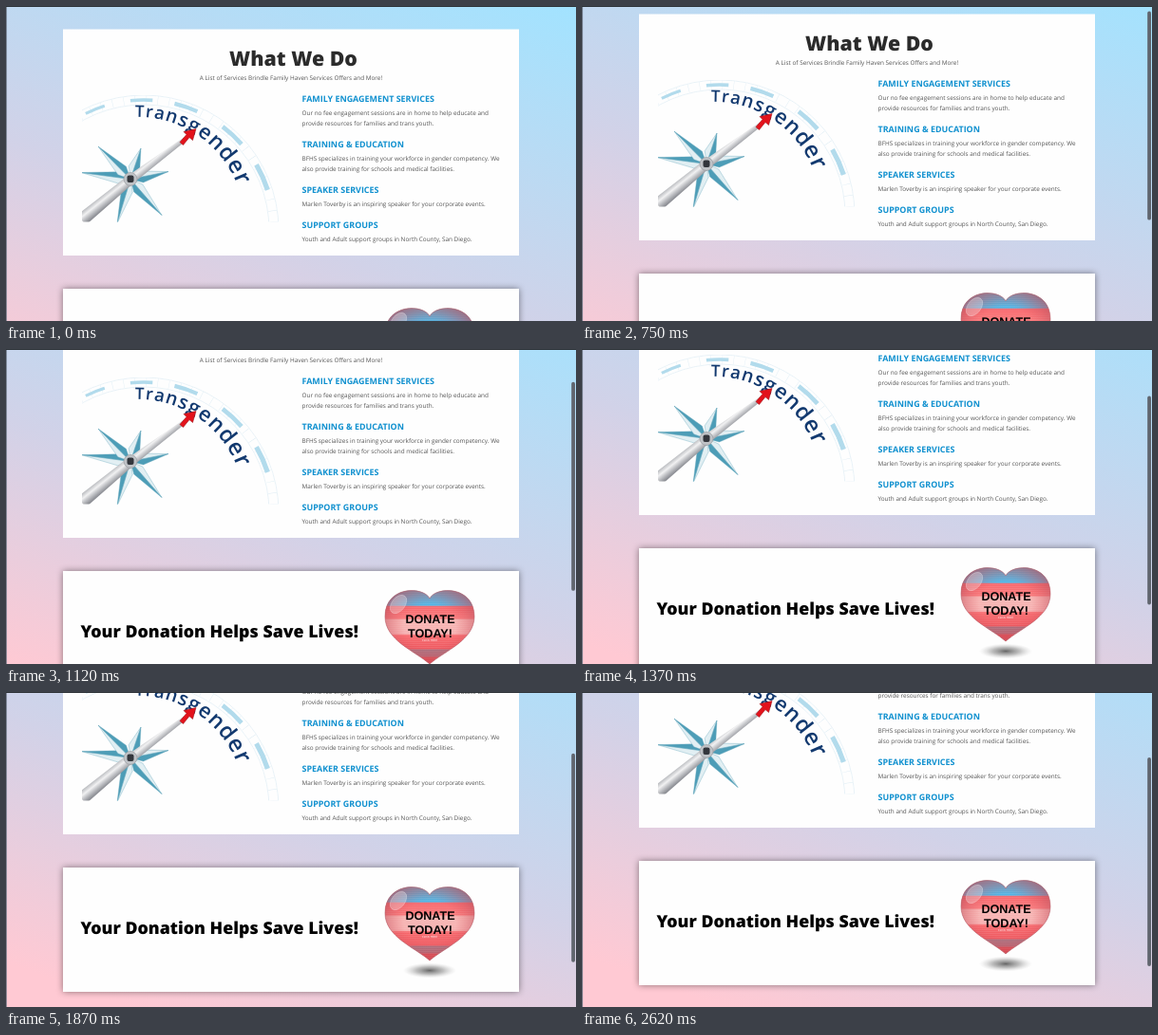
Recreate the animation shown at these times as an HTML page. Size 600x332 px, loop 2.88 s.

```html
<!DOCTYPE html>
<html lang="en">
<head>
<meta charset="utf-8">
<title>What We Do</title>
<style>
@property --s { syntax: "<number>"; inherits: true; initial-value: 0; }
html { animation: scroll 2.88s step-end infinite; }
html, body { margin: 0; width: 100%; height: 100%; overflow: hidden; background: #d3cfe6; }
svg { display: block; width: 600px; height: 332px; }
#page { transform: translateY(calc(var(--s) * -1px)); }
#bar { transform: translateY(calc(var(--s) * .61px - 4.2px)); opacity: min(1, var(--s)); }
text { font-family: "Open Sans", sans-serif; text-rendering: geometricPrecision; }
.title { font-size: 21.33px; font-weight: 800; fill: #2b2b2b; text-anchor: middle; }
.copy { font-size: 6.4px; fill: #555; }
.mid { text-anchor: middle; }
.head { font-size: 8.93px; font-weight: 700; fill: #0f90cf; }
.give { font-size: 17.78px; font-weight: 800; }
.arc { font-weight: 600; letter-spacing: 1px; fill: #12396f; }
.btn { font: 700 12.6px "Liberation Sans", Arial, sans-serif; text-anchor: middle; }
.tiny { font-size: 3px; fill: #fff; }
.lift { filter: drop-shadow(0 0 3.5px rgba(0, 0, 0, .45)); }
@keyframes scroll {
  0% { --s: 0; }
  21.52% { --s: 4; }
  26.04% { --s: 16; }
  30.2% { --s: 31.5; }
  34.72% { --s: 48.5; }
  38.88% { --s: 64; }
  43.4% { --s: 77; }
  47.56% { --s: 88; }
  52.08% { --s: 97; }
  56.24% { --s: 104; }
  60.76% { --s: 109; }
  64.92% { --s: 113; }
  69.44% { --s: 115.5; }
  73.6% { --s: 117.2; }
  78.12% { --s: 118.5; }
  82.28% { --s: 119.5; }
  90.96%, 100% { --s: 120; }
}
</style>
</head>
<body>
<svg viewBox="0 0 600 332">
  <defs>
    <linearGradient id="sky" gradientUnits="userSpaceOnUse" x1="408" y1="-70" x2="192" y2="522">
      <stop offset="0" stop-color="#a2e3ff"/>
      <stop offset=".53" stop-color="#d1d2e8"/>
      <stop offset=".92" stop-color="#ffc9d3"/>
    </linearGradient>
    <linearGradient id="steel" gradientUnits="userSpaceOnUse" x1="127" y1="178" x2="135" y2="188">
      <stop offset="0" stop-color="#b4b6ba"/>
      <stop offset=".4" stop-color="#f1f1f2"/>
      <stop offset=".6" stop-color="#cfd0d3"/>
      <stop offset="1" stop-color="#909298"/>
    </linearGradient>
    <linearGradient id="flag" x2="0" y2="1">
      <stop offset="0" stop-color="#5aa6ca"/>
      <stop offset=".2" stop-color="#4fb5e6"/>
      <stop offset=".22" stop-color="#f8666b"/>
      <stop offset=".38" stop-color="#f97a7c"/>
      <stop offset=".4" stop-color="#f6b4b2"/>
      <stop offset=".59" stop-color="#f6b0b0"/>
      <stop offset=".61" stop-color="#f8696d"/>
      <stop offset=".79" stop-color="#ee5960"/>
      <stop offset=".81" stop-color="#a5707f"/>
      <stop offset=".89" stop-color="#ad6a78"/>
      <stop offset=".92" stop-color="#e2464e"/>
    </linearGradient>
    <radialGradient id="rim" cx=".5" cy=".48" r=".58">
      <stop offset=".5" stop-color="#e0525c" stop-opacity="0"/>
      <stop offset="1" stop-color="#b8525f" stop-opacity=".7"/>
    </radialGradient>
    <radialGradient id="shade">
      <stop offset="0" stop-color="#666"/>
      <stop offset=".5" stop-color="#999" stop-opacity=".65"/>
      <stop offset="1" stop-color="#ccc" stop-opacity="0"/>
    </radialGradient>
    <pattern id="lines" width="4" height="2" patternUnits="userSpaceOnUse">
      <path d="M0 .5H4" stroke="#fff" stroke-width=".5" opacity=".2"/>
    </pattern>
    <clipPath id="photo"><rect x="80" y="94" width="207" height="133.5"/></clipPath>
    <path id="curve" d="M136 117A112 112 0 0 1 251 229"/>
    <path id="heart" d="M446 327C440 314 399 313 399 346C399 371 430 382 446 396C462 382 493 371 493 346C493 313 452 314 446 327Z"/>
  </defs>

  <g id="page">
    <rect width="600" height="460" fill="url(#sky)"/>
    <rect x="60" y="24.5" width="480" height="238.5" fill="#fefefe"/>
    <text class="title" x="302.5" y="62.7">What We Do</text>
    <text class="copy mid" x="300" y="78.2">A List of Services Brindle Family Haven Services Offers and More!</text>

    <g clip-path="url(#photo)">
      <g fill="none" stroke="#dcebf3" stroke-width=".6">
        <circle cx="145" cy="236" r="132"/>
        <circle cx="145" cy="236" r="142"/>
        <circle cx="145" cy="236" r="137" stroke-width="9" stroke-dasharray=".4 11.6"/>
      </g>
      <g id="marks" fill="none" stroke="#b2dbec"></g>
      <g id="star"></g>
      <path d="M187 138.5L189.5 142L135 186L84 231L75 220L128 179Z" fill="url(#steel)"/>
      <circle cx="131" cy="182.5" r="7" fill="#bfc2c6" stroke="#94979c" stroke-width=".6"/>
      <rect x="127.5" y="178.5" width="7" height="7.5" rx="2" fill="#33363c"/>
      <text class="arc"><textPath id="word" href="#curve"></textPath></text>
      <path d="M200 129.5L187 132.5L190 135.5L183 143.5L186.5 146.5L193 138.5L196.5 141.5Z" fill="#e3121b" stroke="#9c1118" stroke-width=".6"/>
    </g>

    <g id="services"></g>

    <rect class="lift" x="60" y="298" width="480" height="131" fill="#fefefe"/>
    <text class="give" x="78.4" y="368">Your Donation Helps Save Lives!</text>
    <ellipse cx="446" cy="406.5" rx="28" ry="8" fill="url(#shade)"/>
    <use href="#heart" fill="url(#flag)"/>
    <use href="#heart" fill="url(#lines)"/>
    <use href="#heart" fill="url(#rim)" stroke="#b8606b" stroke-width=".6"/>
    <ellipse cx="413" cy="333" rx="7" ry="11" transform="rotate(38 413 333)" fill="#fff" fill-opacity=".28" stroke="#fff" stroke-opacity=".4" stroke-width=".6"/>
    <text class="btn" x="446.5" y="353">DONATE</text>
    <text class="btn" x="446.5" y="368">TODAY!</text>
    <text class="tiny mid" x="446" y="372.3">CLICK HERE</text>
  </g>

  <path d="M.5 0V332" stroke="#66707f" opacity=".75"/>
  <path d="M0 .5H600" stroke="#2c3136"/>
  <rect id="bar" x="595.2" y="0" width="3.8" height="220" rx="1.9" fill="#60656e"/>
</svg>
<script>
const NS = "http://www.w3.org/2000/svg";
const add = (id, tag, attrs, text = "") => {
  const el = document.createElementNS(NS, tag);
  for (const k in attrs) el.setAttribute(k, attrs[k]);
  el.textContent = text;
  document.getElementById(id).append(el);
};
const polar = (x, y, r, a) => [x + r * Math.cos(a), y + r * Math.sin(a)];

// Blue blocks on the dial ring, in degrees, growing towards the right
[-112, -91, -71, -47, -24].forEach((deg, i) => {
  const half = 4.5 + i * .4;
  const [from, to] = [deg - half, deg + half].map(d => polar(145, 236, 137, d * Math.PI / 180));
  add("marks", "path", { d: `M${from}A137 137 0 0 1 ${to}`, "stroke-width": 3.2 + i * .5 });
});

// Compass rays: one dark and one pale half each
const hub = [131, 182.5];
for (const tip of [[142, 150], [171, 174.5], [117, 229], [79, 175.5], [97, 148], [164, 220.5]]) {
  const a = Math.atan2(tip[1] - hub[1], tip[0] - hub[0]);
  for (const [turn, fill] of [[-.45, "#e2eff3"], [.45, "#4d9db7"]]) {
    const side = polar(...hub, 14, a + turn);
    add("star", "path", { d: `M${hub}L${side}L${tip}Z`, fill, stroke: "#6aaabd", "stroke-width": .4 });
  }
}

// Dial lettering swells along the curve
[..."Transgender"].forEach((letter, i) =>
  add("word", "tspan", { "font-size": 17 + i * .8 }, letter));

const services = [
  [101.3, "FAMILY ENGAGEMENT SERVICES",
    "Our no fee engagement sessions are in home to help educate and",
    "provide resources for families and trans youth."],
  [149.2, "TRAINING & EDUCATION",
    "BFHS specializes in training your workforce in gender competency. We",
    "also provide training for schools and medical facilities."],
  [197, "SPEAKER SERVICES", "Marlen Toverby is an inspiring speaker for your corporate events."],
  [233.8, "SUPPORT GROUPS", "Youth and Adult support groups in North County, San Diego."]
];
for (const [y, head, ...lines] of services) {
  add("services", "text", { class: "head", x: 311.5, y }, head);
  lines.forEach((line, i) =>
    add("services", "text", { class: "copy", x: 311.5, y: y + 13.9 + i * 10.9 }, line));
}
</script>
</body>
</html>
```
